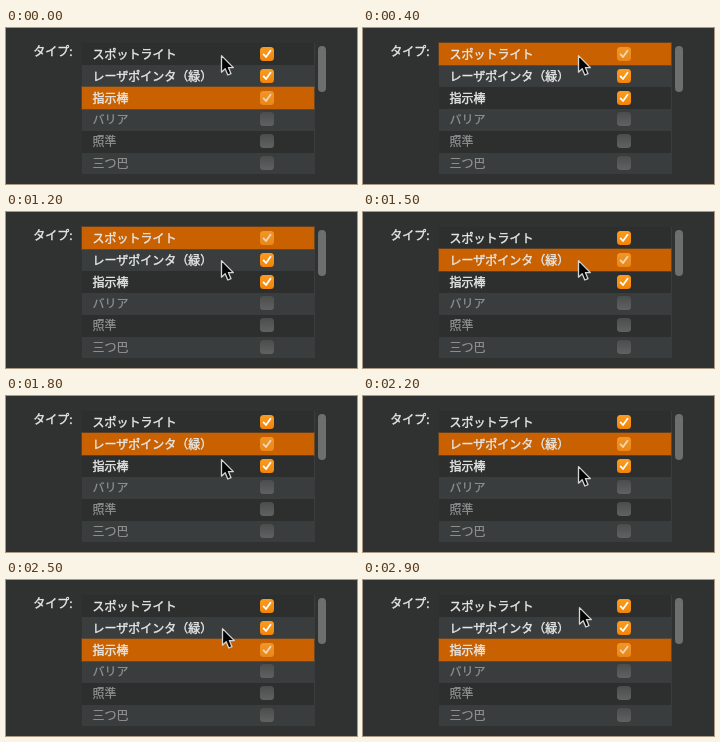
An HTML page for the animation above (3000 ms loop, 351 px wide and 156 px high).

```html
<!DOCTYPE html>
<html lang="ja">
<head>
<meta charset="utf-8">
<style>
html, body { margin: 0; width: 100%; height: 100%; overflow: hidden; background: #303232; }
body { position: relative; font: 12px/22px "Noto Sans CJK JP", "Noto Sans CJK", sans-serif; color: #e6e7e7; -webkit-text-stroke: .4px; }
.label { position: absolute; left: 0; top: 12px; width: 66.5px; text-align: right; white-space: nowrap; }
.list { position: absolute; left: 76px; top: 15px; width: 232px; height: 131px; border-right: 1px solid #3a3d3d;
  background: repeating-linear-gradient(#2d2f2f 0 22px, #393d3e 22px 44px); }
.row { position: relative; height: 22px; padding-left: 10.5px; white-space: nowrap; }
.row i { position: absolute; left: 178px; top: 4px; width: 14px; height: 14px; border-radius: 3.5px; background: linear-gradient(#fb9c22, #f18408); }
.row svg { position: absolute; left: 0; top: 0; fill: none; stroke: #fff; stroke-width: 1.8; stroke-linecap: round; stroke-linejoin: round; }
.off { top: -1px; color: #929494; -webkit-text-stroke: .2px; }
.off i { background: linear-gradient(#4b4d4d, #606262); }
.scroll { position: absolute; left: 312px; top: 18px; width: 8px; height: 46px; border-radius: 4px; background: #6d6f6f; }
.cursor { position: absolute; left: 213px; top: -1px; overflow: visible; animation: move 3s step-end infinite; }

.bar, .tint { position: absolute; animation: select 3s step-end infinite; }
.bar { left: 0; top: 0; width: 232px; height: 22px; background: #c96100; box-shadow: 0 0 0 1px rgba(201, 97, 0, .3); }
.tint { left: 178px; top: 4px; width: 14px; height: 14px; border-radius: 3.5px; background: rgba(222, 140, 55, .35); }
@keyframes select {
  0%, 76.667%, 100% { transform: translateY(44px); }
  13.333% { transform: translateY(0); }
  50% { transform: translateY(22px); }
}
/* The pointer advances in 100 ms ticks. */
@keyframes move {
  0% { transform: translate(0, 26px); }
  26.667% { transform: translate(0, 31px); }
  30% { transform: translate(0, 40px); }
  33.333% { transform: translate(0, 46px); }
  40% { transform: translate(0, 47px); }
  53.333% { transform: translate(0, 49px); }
  56.667% { transform: translate(0, 55px); }
  60% { transform: translate(0, 62px); }
  63.333% { transform: translate(0, 67px); }
  66.667% { transform: translate(0, 69px); }
  80% { transform: translate(0, 60px); }
  83.333% { transform: translate(1px, 47px); }
  86.667% { transform: translate(1px, 41px); }
  90% { transform: translate(1px, 37px); }
  93.333% { transform: translate(1px, 29px); }
  96.667%, 100% { transform: translate(1px, 26px); }
}
</style>
</head>
<body>
<div class="label">タイプ:</div>
<div class="list">
  <div class="bar"></div>
  <div class="row">スポットライト<i><svg width="14" height="14"><path d="M3.6 7.4 6 10 10.5 3.8"/></svg></i></div>
  <div class="row">レーザポインタ（緑）<i><svg width="14" height="14"><path d="M3.6 7.4 6 10 10.5 3.8"/></svg></i></div>
  <div class="row">指示棒<i><svg width="14" height="14"><path d="M3.6 7.4 6 10 10.5 3.8"/></svg></i></div>
  <div class="row off">バリア<i></i></div>
  <div class="row off">照準<i></i></div>
  <div class="row off">三つ巴<i></i></div>
  <div class="tint"></div>
</div>
<div class="scroll"></div>
<svg class="cursor" width="16" height="24">
  <path d="M2.5 2.6V19.2L6.2 15.8 8.8 22 12 20.7 9.4 14.6H14.4Z" fill="#050505" stroke="#d4d5d5" stroke-width="1.3" stroke-linejoin="round"/>
</svg>
</body>
</html>
```
